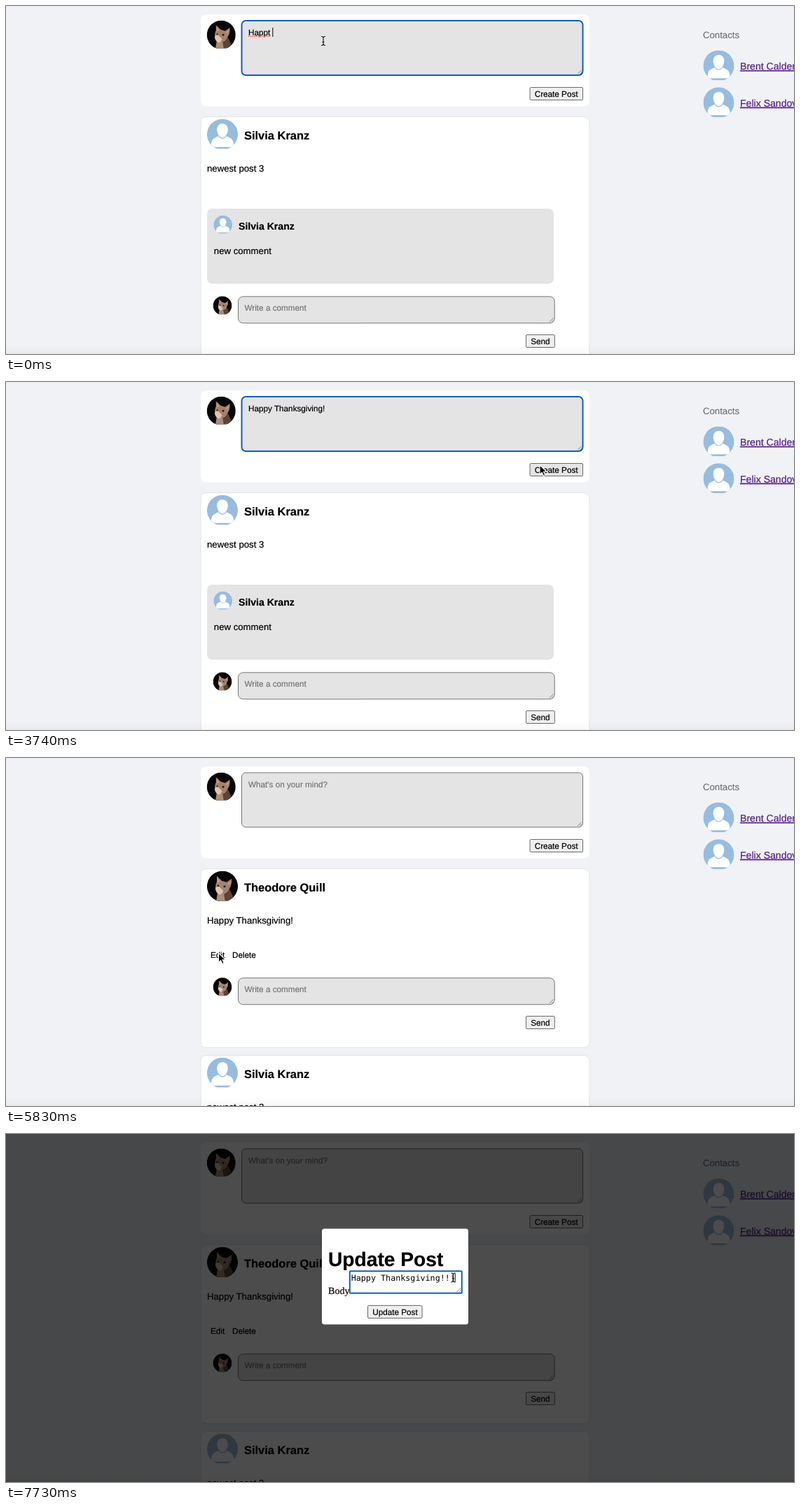
These frames come from a looping animation (1125 px wide and 498 px high, 8000 ms). An HTML page:

```html
<!DOCTYPE html>
<html lang="en">
<head>
<meta charset="utf-8">
<title>Create and edit a post</title>
<style>
  html, body { margin: 0; width: 100%; height: 100%; overflow: hidden; background: #f0f2f5; }
  svg { display: block; width: 1125px; height: 498px; }
  text {
    font: 11.73px "Liberation Sans", Arial, sans-serif; white-space: pre; text-rendering: geometricPrecision;
    fill: var(--ink, #000); stroke: var(--ink, #000); stroke-width: .2px;
  }
  .body { font-size: 13.2px; }
  .link { font-size: 14.08px; --ink: #551a8b; text-decoration: underline; }
  .name { font-size: 16.47px; font-weight: bold; }
  .small { font-size: 14.08px; font-weight: bold; }
  .title { font-size: 28.16px; font-weight: bold; }
  .serif { font: 14.08px "Liberation Serif", Times, serif; }
  .mono { font: 11.73px "DejaVu Sans Mono", monospace; stroke: none; }
  .hint { --ink: #757575; }
  .field { fill: #e4e4e4; stroke: #767676; }
  .comment { fill: #e4e4e4; }
  .plain { fill: #fff; }
  .focus { stroke: #0b5fc6; stroke-width: 2; }
  .button { fill: #efefef; stroke: #6b6b6b; }
  .button.hover { fill: #e5e5e5; }
  .card { fill: #fff; stroke: #e2e4e7; }
</style>
</head>
<body>
<svg id="stage" viewBox="0 0 1125 498"></svg>
<script>
const LOOP = 8000, STEP = 150;
const AUTHOR = 'Theodore Quill', FRIEND = 'Silvia Kranz';
const GREETING = 'Happy Thanksgiving!';

const text = (x, y, str, cls = '', id = '') =>
  `<text x="${x}" y="${y}" class="${cls}" id="${id}">${str}</text>`;
const rect = (x, y, w, h, r, cls, id = '') =>
  `<rect x="${x}" y="${y}" width="${w}" height="${h}" rx="${r}" class="${cls}" id="${id}"/>`;
const picture = (kind, x, y, r, id = '') =>
  `<use href="#${kind}" id="${id}" transform="translate(${x} ${y}) scale(${r / 22})"/>`;
const group = (id, content) => `<g id="${id}">${content}</g>`;

const field = (x, y, w, h, r, cls = '', id = '') => {
  const right = x + w - 1.5, bottom = y + h - 1.5;
  return rect(x, y, w, h, r, 'field ' + cls, id) +
    `<path d="M${right - 6} ${bottom}l6-6M${right - 2.5} ${bottom}l2.5-2.5" stroke="#777" stroke-width=".9"/>`;
};
const button = (x, y, w, label, id = '') =>
  rect(x, y, w, 18, 1.5, 'button', id) + text(x + 6.7, y + 13.1, label);
const commentForm = y =>
  picture('cat', 309, y + 13.2, 13.4) +
  field(331.5, y + .3, 451.7, 38, 7) +
  text(340.5, y + 20.5, 'Write a comment', 'hint') +
  button(742.5, y + 55, 40.8, 'Send');

const defs = `
<defs>
  <clipPath id="round"><path d="M-7.500 20.700A22 22 0 1 1 7.500 20.700Z"/></clipPath>
  <linearGradient id="edge" x2="0" y2="1">
    <stop stop-opacity="0"/><stop offset="1" stop-opacity=".035"/>
  </linearGradient>
  <g id="person" clip-path="url(#round)">
    <path d="M-23-23h46v46h-46z" fill="#96bce0"/>
    <path d="M-16 16Q-16 7-11 5L-5 2H5L11 5Q16 7 16 16Q16 18 14 18H-14Q-16 18-16 16Z" fill="#fff"/>
    <path d="M0-16C5.500-16 8.500-12 8.500-7C8.500-1 4.500 5.500 0 5.500S-8.500-1-8.500-7C-8.500-12-5.500-16 0-16Z" fill="#fff" stroke="#96bce0" stroke-width="1.2"/>
  </g>
  <g id="cat" clip-path="url(#round)">
    <path d="M-23-23h46v46h-46z" fill="#080606"/>
    <path d="M-8 22L-6 8L9 3Q15 10 16 22Z" fill="#5d4434"/>
    <path d="M-9 22L-7 9L2 11L4 22Z" fill="#a98d78"/>
    <path d="M-8-15L-1-8L6-6L13-11Q14-3 10 3Q7 11-2 12Q-10 10-10 2Q-10-3-8-7Z" fill="#a5836a"/>
    <path d="M-10 2Q-6-1-4 1L1 6Q0 11-4 12Q-10 9-10 2Z" fill="#dac6b6"/>
    <path d="M-7-12L-3-7L-7-5ZM12-8L9-2L7-4Z" fill="#c59a85"/>
    <circle cx="-6" cy="-1" r="1.2" fill="#1a1210"/><circle cx="3" cy="0" r="1.5" fill="#1a1210"/>
  </g>
</defs>`;

const contacts =
  text(995, 46.2, 'Contacts', 'body hint') +
  picture('person', 1017.5, 85.5, 22) + text(1048, 91, 'Brent Calder', 'link') +
  picture('person', 1017.5, 138.3, 22) + text(1048, 143.8, 'Felix Sandoval', 'link');

const composer =
  rect(278, 12, 555, 131.5, 8, 'plain') +
  picture('cat', 307.3, 41.3, 20.5) +
  field(336.5, 21, 487, 78, 6, '', 'postField') +
  text(346, 41.5, '', '', 'postText') +
  '<path id="typo" d="M346 43.3h32" stroke="#f33" stroke-width="1.3" stroke-dasharray="1.5 1.2"/>' +
  rect(0, 31, 1, 13, 0, '', 'postCaret') +
  button(748, 116.5, 75.5, 'Create Post', 'create');

const friendPost =
  rect(278, 158.5, 555, 420, 8, 'card') +
  picture('person', 309, 183.7, 22) + text(340, 190.5, FRIEND, 'name') +
  text(287, 236.8, 'newest post 3', 'body') +
  rect(287, 290, 495, 107.5, 8, 'comment') +
  picture('person', 309.7, 313.1, 13.3) + text(332, 319.5, FRIEND, 'small') +
  text(296.8, 355, 'new comment', 'body') +
  commentForm(415.5);

const ownPost =
  rect(278, 158.5, 555, 256, 8, 'card') +
  picture('cat', 309, 183.7, 22, 'ownPicture') + text(340, 190.5, AUTHOR, 'name') +
  text(287, 236.8, GREETING, 'body') +
  text(292, 285.5, 'Edit') + text(323, 285.5, 'Delete') +
  commentForm(314.5);

const modal =
  '<path d="M0 0h1125v498H0z" fill-opacity=".7"/>' +
  rect(451, 135.5, 209, 137, 3.5, 'plain') +
  text(460, 189, 'Update Post', 'title') +
  text(460, 228.5, 'Body', 'serif') +
  field(490.8, 196.3, 160, 31.5, 1, 'plain', 'editField') +
  text(492.7, 209.5, '', 'mono', 'editText') +
  rect(0, 199, 1, 13, 0, '', 'editCaret') +
  button(516.5, 245.5, 77.5, 'Update Post');

const beamPath = 'M-3-6.5Q0-6.5 0-4V4Q0 6.5-3 6.5M3-6.5Q0-6.5 0-4M0 4Q0 6.5 3 6.5M-1.5 1.5h3';
const pointers =
  '<path id="arrow" d="M0 0V13.5L3.1 10.6L5.3 15.5L7.7 14.5L5.5 9.7H9.8Z" stroke="#fff" stroke-width="1.1"/>' +
  `<g id="beam" fill="none"><path d="${beamPath}" stroke="#fff" stroke-opacity=".7" stroke-width="2.6"/>` +
  `<path d="${beamPath}" stroke="#000" stroke-width="1.1"/></g>`;

const stage = document.getElementById('stage');
stage.innerHTML = defs + contacts + composer + group('friend', friendPost) + group('own', ownPost) +
  '<path d="M0 486h1125v12H0z" fill="url(#edge)"/>' + group('modal', modal) + pointers;

const el = id => document.getElementById(id);
const show = (id, on) => el(id).style.display = on ? '' : 'none';
const place = (id, x, y) => el(id).setAttribute('transform', `translate(${x} ${y})`);

// [time, typed characters of the greeting]
const typing = [[150, 4], [300, 5], [600, 6], [900, 7], [1050, 9], [1200, 10], [1490, 12],
  [1790, 14], [2090, 15], [2240, 17], [2390, 18], [2840, 19]];

function typedText(t) {
  const key = typing.filter(([at]) => at <= t).pop();
  return key ? GREETING.slice(0, key[1]) : 'Happt ';
}

const easeOut = p => 1 - (1 - p) ** 2.8;
const smooth = p => p * p * (3 - 2 * p);
const moves = [
  { at: 3290, steps: 6, x: 777, y: 123, ease: easeOut, lift: 60 },
  { at: 4930, steps: 7, x: 303.5, y: 279, ease: smooth, lift: 0 },
  { at: 5980, steps: 1, x: 305, y: 279, ease: smooth, lift: 0 },
  { at: 6130, steps: 5, x: 638.5, y: 205.5, ease: smooth, lift: 0 },
];

function pointerAt(t) {
  let x = 453, y = 50;
  for (const m of moves) {
    if (t < m.at) break;
    const step = Math.min(m.steps, Math.floor((t - m.at) / STEP) + 1);
    const p = m.ease(step / m.steps);
    x += (m.x - x) * p;
    y += (m.y - y) * p - m.lift * 6.75 * p * (1 - p) ** 2;
  }
  return [x, y];
}

function setField(id, str, caretOn) {
  const label = el(id + 'Text');
  if (label.textContent !== str) label.textContent = str;
  const start = Number(label.getAttribute('x'));
  el(id + 'Caret').setAttribute('x', start + label.getComputedTextLength() - .2);
  show(id + 'Caret', caretOn);
}

function render(t) {
  const posted = t >= 4480, editing = t >= 5980, editFocus = t >= 6830;
  show('own', posted);
  show('ownPicture', t >= 4930);
  place('friend', 0, posted ? 267 : 0);
  show('modal', editing);

  show('typo', t < 150);
  el('postField').classList.toggle('focus', t < 4330);
  el('postText').classList.toggle('hint', posted);
  setField('post', posted ? "What's on your mind?" : typedText(t), t < 3440);

  if (editing) {
    const extra = t >= 7730 ? 2 : t >= 7580 ? 1 : 0;
    el('editField').classList.toggle('focus', editFocus);
    setField('edit', GREETING + '!'.repeat(extra), editFocus);
  }

  const [x, y] = pointerAt(t);
  const inside = (l, top, r, b) => x > l && x < r && y > top && y < b;
  const overField = editing ? inside(491, 196, 651, 228) : inside(337, 10, 824, 99);
  el('create').classList.toggle('hover', !editing && inside(748, 116, 824, 135));
  show('beam', overField);
  show('arrow', !overField);
  place(overField ? 'beam' : 'arrow', x, y);
}

function tick() {
  render(performance.now() % LOOP);
  requestAnimationFrame(tick);
}
tick();
</script>
</body>
</html>
```
